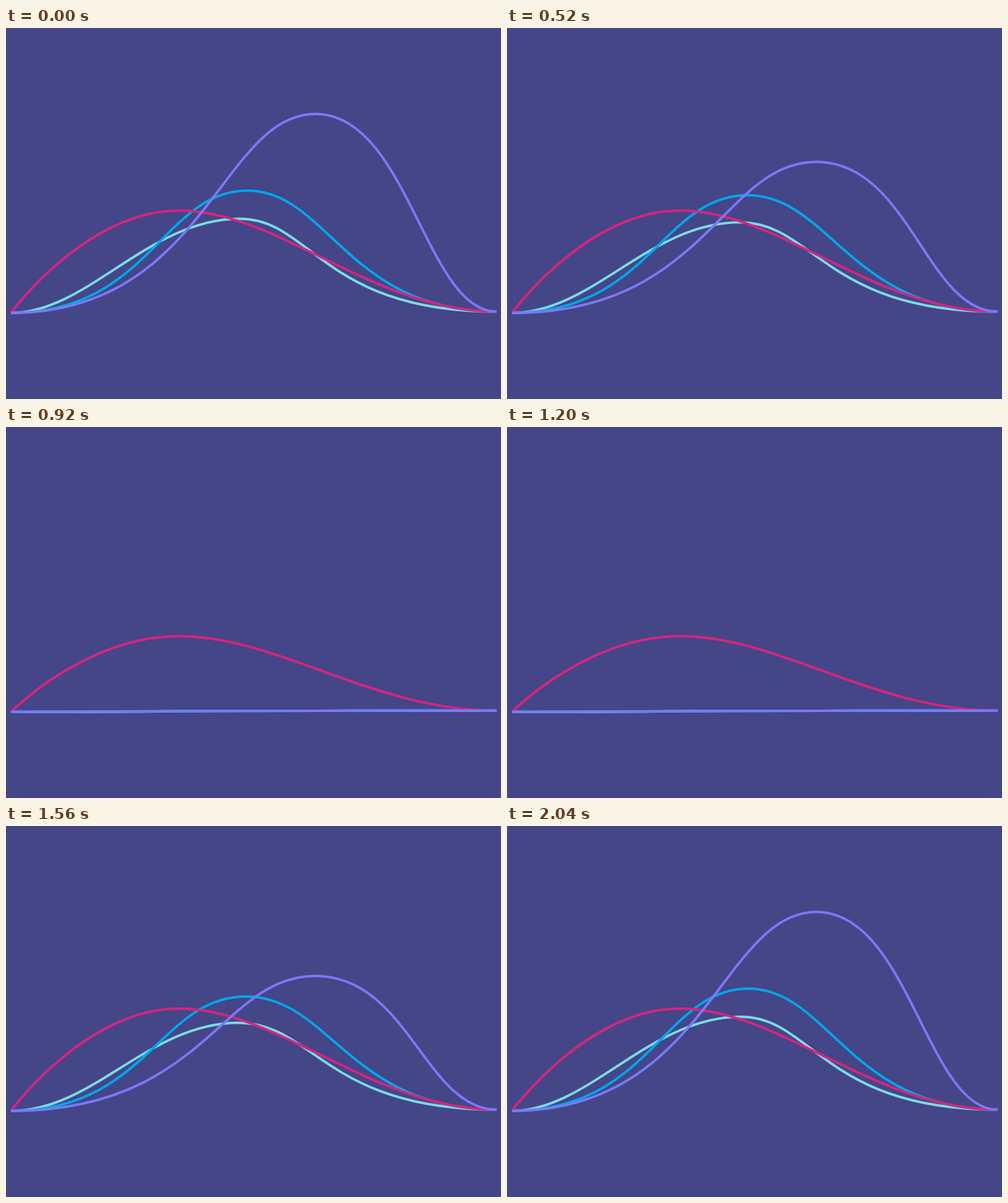
Animation, 800 px wide and 600 px high, one loop 2.16 s. Source, as an HTML page:

```html
<!DOCTYPE html>
<html lang="en">
<head>
<meta charset="utf-8">
<title>Curves</title>
<style>
  html, body { margin: 0; width: 100%; height: 100%; overflow: hidden; background: #444687; }
  svg { display: block; width: 100vw; height: 100vh; }
  path { fill: none; stroke-width: 4; }
</style>
</head>
<body>
<svg viewBox="0 0 800 600"></svg>
<script>
const LOOP = 2160, STEP = 40;
const LEFT = 8, LEFT_Y = 460.8, RIGHT = 793, RIGHT_Y = 458.7, FLAT_Y = 459;

// Poses: [peak x, peak y, handle lengths: start, peak left, peak right, end]
const curves = [
  { color: '#7cdae5', start: 1242, length: 522,
    flat: [346, FLAT_Y, 280, 110, 186, 194], full: [378, 308.5, 124, 148, 116, 282] },
  { color: '#00a6ea', start: 1242, length: 522,
    flat: [358, FLAT_Y, 165, 190, 199, 174], full: [390, 263, 224, 136, 130, 241] },
  { color: '#d6247f', start: 1080, length: 352,
    flat: [279.5, FLAT_Y, 0, 151, 162, 200], full: [279.5, 295.3, 0, 151, 162, 200] },
  { color: '#7979f6', start: 1355, length: 685,
    flat: [500, FLAT_Y, 315, 153, 150, 115], full: [500, 139, 315, 153, 150, 115] }
];

const svg = document.querySelector('svg');
for (const curve of curves) {
  curve.path = document.createElementNS('http://www.w3.org/2000/svg', 'path');
  curve.path.setAttribute('stroke', curve.color);
  svg.append(curve.path);
}

// Cubic easing with a short ramp and a long soft landing
function ease(x) {
  if (x <= 0) return 0;
  if (x >= 1) return 1;
  let low = 0, high = 1;
  for (let i = 0; i < 30; i++) {
    const q = (low + high) / 2, r = 1 - q;
    const value = 3 * 0.285 * r * r * q - 3 * 0.036 * r * q * q + q * q * q;
    if (value < x) low = q; else high = q;
  }
  return low * low * (3 - 2 * low);
}

function outline(curve, time) {
  const p = ease((time - curve.start) / curve.length);
  const [x, y, a, b, c, d] = curve.flat.map((v, i) => v + (curve.full[i] - v) * p);
  return `M${LEFT} ${LEFT_Y}C${LEFT + a} ${LEFT_Y} ${x - b} ${y} ${x} ${y}` +
    `C${x + c} ${y} ${RIGHT - d} ${RIGHT_Y} ${RIGHT} ${RIGHT_Y}`;
}

function draw(now) {
  const tick = Math.floor(now % LOOP / STEP) * STEP;
  // The first half plays the rise backwards
  const time = Math.max(tick, LOOP - STEP - tick);
  for (const curve of curves) curve.path.setAttribute('d', outline(curve, time));
}

const begin = performance.now();
function loop() {
  draw(performance.now() - begin);
  requestAnimationFrame(loop);
}
loop();
</script>
</body>
</html>
```
